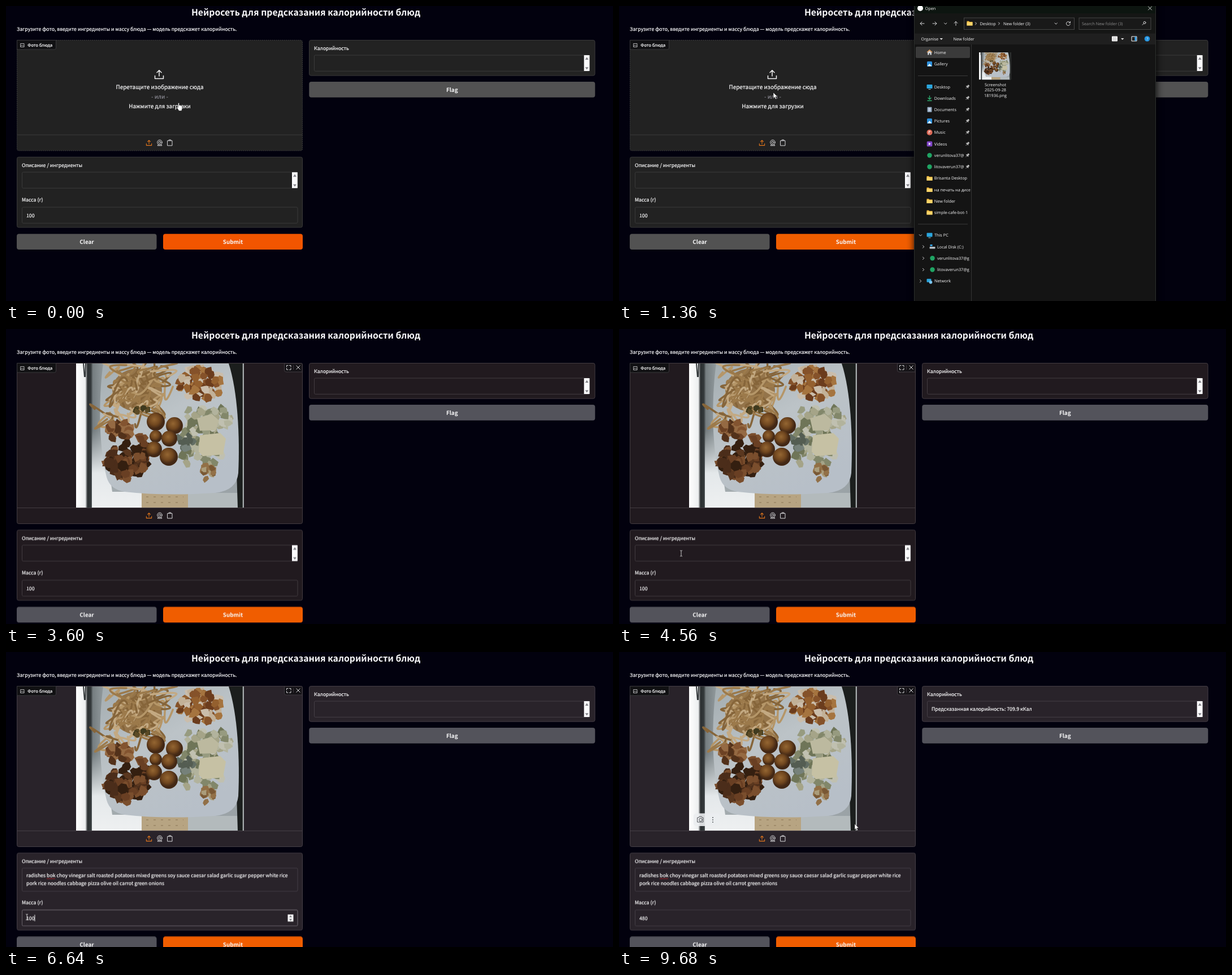
Animation, 1074 px wide and 522 px high, one loop 9760 ms. Source, as an HTML page:

```html
<!DOCTYPE html>
<html lang="ru">
<head>
<meta charset="utf-8">
<title>Калорийность блюд</title>
<style>
html, body { margin: 0; width: 100%; height: 100%; overflow: hidden; background: #02010e; }
svg { display: block; }
#stage { width: 1074px; height: 522px; }
text {
  font: 8.73px "Noto Sans CJK SC", "Noto Sans CJK JP", "Noto Sans", sans-serif;
  fill: #f8f8f9; stroke: #f8f8f9; stroke-width: .22px;
  text-rendering: geometricPrecision; white-space: pre;
}
.mid { text-anchor: middle; }
.title { font-size: 15.75px; font-weight: 600; stroke: none; }
.big { font-size: 9.95px; }
.bold { font-size: 9.87px; font-weight: 600; stroke: none; }
.tag { font-size: 7.45px; }
#dialog text { font: 7.3px "Open Sans", "Noto Sans", sans-serif; stroke: none; }
.line { fill: none; stroke: #d8d8da; stroke-width: 1; stroke-linecap: round; stroke-linejoin: round; }
#food { filter: blur(.5px); }

/* every state change shares one loop */
.s { animation: 9.76s step-end infinite; }
.panel { animation: panel 9.76s step-end infinite; }
.edge { fill: none; animation: edge 9.76s step-end infinite; }
.grey { animation: grey 9.76s step-end infinite; }
.orange { animation: orange 9.76s step-end infinite; }
@keyframes panel { 0% { fill: #222222; } 36.88% { fill: #211a1f; } 48.36%, 100% { fill: #29232a; } }
@keyframes edge { 0% { stroke: #3a3a3a; } 36.88% { stroke: #433c41; } 48.36%, 100% { stroke: #453f46; } }
@keyframes grey { 0% { fill: #525252; } 36.88%, 100% { fill: #53535b; } }
@keyframes orange { 0% { fill: #f25500; } 12.29%, 100% { fill: #f05d00; } }

@keyframes before { 0% { opacity: 1; } 36.88%, 100% { opacity: 0; } }
@keyframes after { 0% { opacity: 0; } 36.88%, 100% { opacity: 1; } }
@keyframes drop { 0% { transform: none; } 36.88%, 100% { transform: translateY(88.4px); } }
@keyframes grow { 0% { transform: none; } 50.81%, 100% { transform: translateY(12px); } }
@keyframes short { 0% { opacity: 1; } 50.81%, 100% { opacity: 0; } }
@keyframes tall { 0% { opacity: 0; } 50.81%, 100% { opacity: 1; } }
@keyframes dialog { 0% { opacity: 0; } 12.29% { opacity: 1; } 36.88%, 100% { opacity: 0; } }
@keyframes pick { 0% { opacity: 0; } 24.58%, 100% { opacity: 1; } }
@keyframes descFocus { 0% { opacity: 0; } 50.81% { opacity: 1; } 65.56%, 100% { opacity: 0; } }
@keyframes massFocus { 0% { opacity: 0; } 65.56% { opacity: 1; } 92.62%, 100% { opacity: 0; } }
@keyframes mass100 { 0% { opacity: 1; } 78.68%, 100% { opacity: 0; } }
@keyframes mass4 { 0% { opacity: 0; } 78.68% { opacity: 1; } 81.14%, 100% { opacity: 0; } }
@keyframes mass48 { 0% { opacity: 0; } 81.14% { opacity: 1; } 85.24%, 100% { opacity: 0; } }
@keyframes mass480 { 0% { opacity: 0; } 85.24%, 100% { opacity: 1; } }
@keyframes caret {
  0% { transform: translateX(14.5px); } 78.68% { transform: translateX(4.8px); }
  81.14% { transform: translateX(9.7px); } 85.24%, 100% { transform: translateX(14.5px); }
}
@keyframes result { 0% { opacity: 0; } 95.08%, 100% { opacity: 1; } }
@keyframes lens { 0% { opacity: 0; } 96.72%, 100% { opacity: 1; } }

#cursor { animation: move 9.76s ease-in-out infinite; }
@keyframes move {
  0%, 0.82% { transform: translate(307px, 178px); }
  9.2%, 14.75% { transform: translate(273px, 153px); }
  23.7%, 30.32% { transform: translate(664px, 112px); }
  37.7% { transform: translate(560px, 260px); }
  45%, 50.81% { transform: translate(110px, 397px); }
  54%, 55.8% { transform: translate(93px, 442px); }
  64%, 85.24% { transform: translate(37px, 469px); }
  92%, 94% { transform: translate(402px, 511px); }
  98.4%, 100% { transform: translate(417px, 304px); }
}
@keyframes hand {
  0% { opacity: 1; } 12.29% { opacity: 0; } 91% { opacity: 1; } 95.08%, 100% { opacity: 0; }
}
@keyframes arrow {
  0% { opacity: 0; } 12.29% { opacity: 1; } 30.32% { opacity: 0; } 37.7% { opacity: 1; }
  44% { opacity: 0; } 52.4% { opacity: 1; } 63% { opacity: 0; } 86.5% { opacity: 1; }
  91% { opacity: 0; } 95.08%, 100% { opacity: 1; }
}
@keyframes beam {
  0% { opacity: 0; } 44% { opacity: 1; } 52.4% { opacity: 0; }
  63% { opacity: 1; } 86.5%, 100% { opacity: 0; }
}
</style>
</head>
<body>
<svg id="stage" viewBox="0 0 1074 522">
<defs>
  <g id="scroll">
    <rect width="9.800" height="28" fill="#fbfbfd"/>
    <path d="M2 8h6L5 3.400zM2 21.200h6L5 25.600z" fill="#85858a"/>
  </g>
  <path id="up" d="M0 3V-7M-4-3.200 0-7.200 4-3.200M-7.500 2.500V7.500H7.500V2.500"/>
  <g id="tools">
    <use href="#up" transform="translate(253 242) scale(.62)" class="line" style="stroke:#e8791c;stroke-width:1.7"/>
    <g class="line">
      <circle cx="272" cy="241.300" r="4.300"/><circle cx="272" cy="241.300" r="2"/>
      <path d="M269.500 245 268 247h8l-1.500-2M286 238.300h8v8.700h-8zM288.300 238.300v-1.500h3.400v1.500"/>
    </g>
  </g>
  <clipPath id="photoBox"><rect x="124" y="61" width="297" height="255"/></clipPath>
  <clipPath id="sideBox"><rect x="523" y="68" width="98.500" height="454"/></clipPath>
  <linearGradient id="table">
    <stop offset="0" stop-color="#fff"/><stop offset=".055" stop-color="#eceeef"/>
    <stop offset=".068" stop-color="#2b2f31"/><stop offset=".088" stop-color="#33383a"/>
    <stop offset=".1" stop-color="#757d80"/><stop offset=".2" stop-color="#a3abae"/>
    <stop offset="1" stop-color="#9aa2a6"/>
  </linearGradient>
  <linearGradient id="plate" x2=".6" y2="1">
    <stop offset="0" stop-color="#a4adb1"/><stop offset=".5" stop-color="#bcc3c7"/>
    <stop offset="1" stop-color="#b7bfc8"/>
  </linearGradient>
  <radialGradient id="potato" cx=".42" cy=".38">
    <stop offset="0" stop-color="#946632"/><stop offset=".6" stop-color="#71471f"/>
    <stop offset="1" stop-color="#432815"/>
  </radialGradient>
  <linearGradient id="glow" x2="0" y2="1">
    <stop offset="0" stop-color="#d5dbdd" stop-opacity="0"/><stop offset=".55" stop-color="#e4e8ea"/>
    <stop offset="1" stop-color="#eef0f1"/>
  </linearGradient>
  <g id="photo" clip-path="url(#photoBox)">
    <rect x="124" y="61" width="297" height="255" fill="url(#table)"/>
    <path d="M152 180h20l16 108h54v28h-90z" fill="url(#glow)"/>
    <path d="M322 290h88v26h-88z" fill="#b3babc"/>
    <path d="M390 61h29v255h-9L404 120z" fill="#1b1e1d"/>
    <path d="M419.500 61v255" stroke="#b0b4b4" stroke-width="1.500"/>
    <path d="M137 61l2 24M141 61l-1 24" stroke="#34383a" stroke-width="2"/>
    <path d="M240 290h82v26h-82z" fill="#b7a482"/>
    <path d="M248 297h66M248 307h66" stroke="#8a7554" stroke-dasharray="4 9"/>
    <path d="M172 61C165 110 162 200 178 262Q184 284 210 288 280 296 370 290 408 286 411 255C414 190 410 110 394 61Z" fill="url(#plate)"/>
    <g id="food"></g>
  </g>
</defs>

<text class="title mid" x="530.500" y="16.700">Нейросеть для предсказания калорийности блюд</text>
<text x="19" y="44.300">Загрузите фото, введите ингредиенты и массу блюда — модель предскажет калорийность.</text>

<!-- output column -->
<rect class="panel" x="536.500" y="60.500" width="505.500" height="62.600" rx="3"/>
<rect class="edge" x="536.500" y="60.500" width="505.500" height="62.600" rx="3"/>
<text x="545" y="77.600">Калорийность</text>
<rect class="edge" x="545.500" y="87" width="487" height="28.300" rx="2"/>
<use href="#scroll" x="1022.700" y="87"/>
<text class="s" style="animation-name:result" x="553" y="104.300">Предсказанная калорийность: 709.9 кКал</text>
<rect class="grey" x="536.300" y="134" width="506" height="27.800" rx="4"/>
<text class="bold mid" x="789.300" y="151.700">Flag</text>

<!-- empty upload area -->
<g class="s" style="animation-name:before">
  <rect x="19.500" y="60.500" width="505" height="195.500" rx="3" fill="#222" stroke="#3f3f3f" stroke-dasharray="2 1.500"/>
  <path d="M19.500 228h505" stroke="#3a3a3a"/>
  <use href="#up" x="271" y="121" class="line" style="stroke:#f4f4f5;stroke-width:1.500"/>
  <text class="big mid" x="272" y="147.300">Перетащите изображение сюда</text>
  <text class="big mid" x="272" y="164.300" style="fill:#a5a4b0;stroke:none">- или -</text>
  <text class="big mid" x="272" y="180.800">Нажмите для загрузки</text>
  <use href="#tools"/>
</g>

<!-- loaded photo -->
<g class="s" style="animation-name:after">
  <rect class="panel" x="19.500" y="60.500" width="505" height="284" rx="3"/>
  <use href="#photo"/>
  <path class="edge" d="M19.500 316.500h505"/>
  <rect class="edge" x="19.500" y="60.500" width="505" height="284" rx="3"/>
  <use href="#tools" y="88"/>
  <path d="M492.500 61V73q0 3 3 3H524V61z" fill="#151317" stroke="#403a41"/>
  <path d="M508.500 64v8" stroke="#403a41"/>
  <path class="line" d="M496.500 67v-2.500h2.500M501.500 64.500h2.500V67M504 69.500V72h-2.500M499 72h-2.500v-2.500M513.800 64.800l6.400 6.400M520.200 64.800l-6.400 6.400"/>
  <g class="s" style="animation-name:lens">
    <rect x="132" y="285.500" width="46" height="22.500" rx="5" fill="#eceef0" opacity=".9"/>
    <g class="line" style="stroke:#55585c"><path d="M139 293h2l1-1.800h4l1 1.800h2v8h-10z"/><circle cx="144.500" cy="297" r="2.800"/></g>
    <g fill="#55585c"><circle cx="166" cy="293" r="1"/><circle cx="166" cy="297" r="1"/><circle cx="166" cy="301" r="1"/></g>
  </g>
</g>
<path d="M19.500 60.500H88.500V74q0 3-3 3H19.500z" fill="#111113" stroke="#39383b"/>
<path class="line" style="stroke-width:.8" d="M26 66.500h6v6h-6zM26 71l2-2 1.500 1.500 1-1 1.500 1.500"/>
<text class="tag" x="38.300" y="71.900">Фото блюда</text>

<!-- inputs -->
<g class="s" style="animation-name:drop">
  <g class="s" style="animation-name:short">
    <rect class="panel" x="19.500" y="267.300" width="505" height="124.500" rx="3"/>
    <rect class="edge" x="19.500" y="267.300" width="505" height="124.500" rx="3"/>
    <rect class="edge" x="28.500" y="294" width="487.500" height="28.300" rx="2"/>
    <use href="#scroll" x="506" y="294.200"/>
  </g>
  <g class="s" style="animation-name:tall">
    <rect class="panel" x="19.500" y="267.300" width="505" height="136.500" rx="3"/>
    <rect class="edge" x="19.500" y="267.300" width="505" height="136.500" rx="3"/>
    <rect class="edge" x="28.500" y="294" width="487.500" height="41" rx="2"/>
    <text x="36" y="310.300">radishes bok choy vinegar salt roasted potatoes mixed greens soy sauce caesar salad garlic sugar pepper white rice</text>
    <text x="36" y="323.600">pork rice noodles cabbage pizza olive oil carrot green onions</text>
    <path d="M72 313.200l1.500-1 1.500 1 1.500-1 1.500 1 1.500-1 1.500 1 1.500-1 1.500 1 1.500-1 1.500 1" fill="none" stroke="#c8262c" stroke-width=".9"/>
  </g>
  <g class="s" style="animation-name:descFocus">
    <rect x="28.500" y="294" width="487.500" height="41" rx="2" fill="none" stroke="#666068"/>
    <path d="M279.500 314.200v11.500" stroke="#fff"/>
  </g>
  <text x="28" y="285.100">Описание / ингредиенты</text>
  <g class="s" style="animation-name:grow">
    <text x="28" y="346.300">Масса (г)</text>
    <rect class="edge" x="28.500" y="356" width="487.500" height="28.300" rx="2"/>
    <text class="s" style="animation-name:mass100" x="36" y="373.600">100</text>
    <text class="s" style="animation-name:mass4" x="36" y="373.600">4</text>
    <text class="s" style="animation-name:mass48" x="36" y="373.600">48</text>
    <text class="s" style="animation-name:mass480" x="36" y="373.600">480</text>
    <g class="s" style="animation-name:massFocus">
      <rect x="28.500" y="356" width="487.500" height="28.300" rx="2" fill="none" stroke="#666068"/>
      <path class="s" style="animation-name:caret" d="M36.300 364.500v11.500" stroke="#fff"/>
      <rect x="498.500" y="364" width="10" height="12.500" fill="#f4f4f6"/>
      <path d="M501 368.700h5l-2.500-3zM501 372h5l-2.500 3z" fill="#6d6d72"/>
    </g>
    <rect class="grey" x="19" y="403.200" width="247.500" height="27.900" rx="4"/>
    <rect class="orange" x="278" y="403.200" width="247" height="27.900" rx="4"/>
    <text class="bold mid" x="143" y="420.900">Clear</text>
    <text class="bold mid" x="401.500" y="420.900">Submit</text>
  </g>
</g>

<!-- file chooser -->
<g id="dialog" class="s" style="animation-name:dialog">
  <rect x="523" y="-10" width="427" height="542" style="filter:drop-shadow(0 0 7px #000)" fill="#141414"/>
  <rect x="523" width="427" height="13" fill="#0d1510"/>
  <rect x="523" y="13" width="427" height="35.500" fill="#151615"/>
  <rect x="523" y="48.500" width="427" height="19.500" fill="#1f1f1f"/>
  <path d="M522.500 0v522M949.500 0v522" stroke="#2c2f2d"/>
  <circle cx="533" cy="4" r="5" fill="#fff"/>
  <text x="541.500" y="7.200">Open</text>
  <rect x="610.500" y="21" width="195" height="20.500" fill="#191919" stroke="#464646"/>
  <rect x="814" y="21" width="127" height="20.500" fill="#191919" stroke="#464646"/>
  <g class="line">
    <path d="M936.500 1l6 6M942.500 1l-6 6M540 31h-7M536 28l-3 3 3 3M555 31h7M559 28l3 3-3 3M596 34.500v-7M593 30.500l3-3 3 3"/>
    <path d="M575.500 30l2.200 2.200 2.200-2.200M771 30l2.200 2.200 2.200-2.200M630.500 29l2 2-2 2M671.500 29l2 2-2 2"/>
    <path d="M798 29.500a3.500 3.500 0 1 0 .3 2.500M798.500 27.500v2.300h-2.300M926 33.500l2.700-2.700"/>
    <circle cx="930" cy="29.500" r="2"/>
  </g>
  <text x="638.500" y="33.700">Desktop</text>
  <text x="680" y="33.700">New folder (3)</text>
  <text x="819" y="33.700" style="fill:#8c8c8c">Search New folder (3)</text>
  <text x="534.500" y="60.700">Organise</text>
  <text x="591.500" y="60.700">New folder</text>
  <path d="M567.500 57h5.500l-2.700 3zM888 57h5.500l-2.700 3z" fill="#ddd"/>
  <path d="M872.500 54h9v8h-9z" fill="#ddd" stroke="#fff"/>
  <path d="M907 54h9v8h-9z" fill="none" stroke="#fff"/><path d="M912.500 54.500h3v7h-3z" fill="#39a5ef"/>
  <circle cx="934.500" cy="58" r="4.800" fill="#2394e0"/>
  <text class="mid" x="934.500" y="60.700">?</text>
  <path d="M623.500 68v454" stroke="#343434"/>
  <path d="M529 123.500h88M529 386h88" stroke="#3a3a3a"/>
  <rect x="525" y="72" width="96" height="20" rx="2" fill="#3a3a3a"/>
  <g id="side" clip-path="url(#sideBox)"></g>
  <rect class="s" style="animation-name:pick" x="633.500" y="72.500" width="65.500" height="91.500" fill="#5c5c5c" stroke="#b9b9b9"/>
  <use href="#photo" transform="translate(613.400 70.400) scale(.19)"/>
  <text class="mid" x="666" y="141.700">Screenshot</text>
  <text class="mid" x="666" y="151.200">2025-09-28</text>
  <text class="mid" x="666" y="160.500">181936.png</text>
</g>

<g id="cursor">
  <path class="s" style="animation-name:arrow" d="M0 0V10.500L2.400 8.300 4.100 12 5.800 11.200 4.100 7.600H7.400Z" fill="#fff" stroke="#111" stroke-width=".6"/>
  <path class="s" style="animation-name:hand" d="M-2.500-6q1.200-1 2 0V-2.500l3.800.8q1.500.5 1.500 2V3.500L3.600 7.500H-1L-4.500 2q-.3-1.500 1-1.300L-2.500 1.500Z" fill="#fff" stroke="#222" stroke-width=".6"/>
  <path class="s" style="animation-name:beam" d="M-2-5H-.500L0-4.500.500-5H2M0-4.500V4.500M-2 5H-.500L0 4.500.500 5H2" fill="none" stroke="#dcdcdc" stroke-width=".9"/>
</g>
</svg>

<script>
const byId = id => document.getElementById(id);

// sidebar
const icons = {
  home: '<path d="M-4.500 0 0-4 4.500 0" fill="none" stroke="#e8a35e" stroke-width="1.500"/><path d="M-3.300 0 0-2.800 3.300 0V4.500H1V1.500H-1V4.500H-3.300z" fill="#d9dce0"/>',
  pics: '<rect x="-4.500" y="-4.500" width="9" height="9" rx="1.500" fill="#2b8fdc"/><path d="M-4 4 0-.5 4 4z" fill="#e4f2fd"/>',
  screen: '<rect x="-5" y="-4" width="10" height="7" rx="1" fill="#2ba6de"/><path d="M-2 4.500H2" stroke="#9cc"/>',
  down: '<path d="M0-4.500V2M-3-.8 0 2.200 3-.8M-4 4.500H4" fill="none" stroke="#2fb574" stroke-width="1.300"/>',
  doc: '<rect x="-4" y="-4.500" width="8" height="9" rx="1" fill="#8ea6bd"/><path d="M-2-2H2M-2 0H2M-2 2H2" stroke="#eef"/>',
  music: '<circle r="5" fill="#dc6a58"/><path d="M-1 2V-2.500L2-1.500" fill="none" stroke="#fff"/>',
  video: '<rect x="-4.800" y="-4.500" width="9.600" height="9" rx="1.500" fill="#8146c8"/><path d="M-1.500-2.200V2.200L2.300 0z" fill="#fff"/>',
  cloud: '<circle r="4.200" fill="#1fa463"/>',
  folder: '<path d="M-5-3.800h3.500l1.200 1.300H5v6.500H-5z" fill="#eeb83e"/><path d="M-5-1.500H5v5.500H-5z" fill="#fbd56a"/>',
  disk: '<rect x="-5" y="0" width="10" height="3.500" rx="1" fill="#b8c0c6"/><rect x="-4" y="-4" width="4" height="3" fill="#37a3e4"/>',
  net: '<rect x="-5" y="-4" width="8" height="6" rx="1" fill="#2ba6de"/><circle cx="2" cy="2" r="2.800" fill="#7cc4ee"/>'
};
const put = (name, x, y) => `<g transform="translate(${x} ${y})">${icons[name]}</g>`;
const pin = y => `<path transform="translate(616.500 ${y})" d="M-3 3-.500.500M-2.300-1.200 1.200 2.300 1.400.200 3.400-1.600 1.600-3.400-.200-1.400z" fill="#bbb" stroke="#bbb" stroke-width=".8"/>`;
const row = ([icon, label, y, pinned]) => put(icon, 549.5, y) +
  `<text x="557.800" y="${y + 2.6}">${label}</text>` + (pinned ? pin(y) : '');
const branch = ([icon, label, y, x, open]) => put(icon, x - 8.5, y) +
  `<text x="${x}" y="${y + 2.6}">${label}</text><path class="line" transform="translate(${x - 24.5} ${y})" d="${open ? 'M-2.200-1 0 1.200 2.200-1' : 'M-1-2.200 1.200 0-1 2.200'}"/>`;

byId('side').innerHTML = [
  ['home', 'Home', 82], ['pics', 'Gallery', 102.5],
  ['screen', 'Desktop', 143, 1], ['down', 'Downloads', 163, 1],
  ['doc', 'Documents', 183.3, 1], ['pics', 'Pictures', 203.5, 1],
  ['music', 'Music', 223.8, 1], ['video', 'Videos', 244, 1],
  ['cloud', 'verunlitova37@', 264.3, 1], ['cloud', 'litovaverun37@', 284.5, 1],
  ['folder', 'Brisanta Desktop', 304.7], ['folder', 'на печать на дисер', 325],
  ['folder', 'New folder', 345], ['folder', 'simple-cafe-bot-1', 365.2]
].map(row).join('') + [
  ['screen', 'This PC', 405.6, 558, 1], ['disk', 'Local Disk (C:)', 426, 563],
  ['cloud', 'verunlitova37@g', 446.3, 563], ['cloud', 'litovaverun37@g', 466.5, 563],
  ['net', 'Network', 486.7, 558]
].map(branch).join('');
byId('dialog').insertAdjacentHTML('beforeend', put('folder', 620.5, 30.5));

// plate of food from seeded shapes
let seed = 11;
const rnd = () => (seed = seed * 16807 % 2147483647) / 2147483647;
const span = r => (rnd() * 2 - 1) * r;
const pickOne = list => list[Math.floor(rnd() * list.length)];

function chunks(cx, cy, rx, ry, count, size, colors) {
  let out = '';
  for (let i = 0; i < count; i++) {
    const a = rnd() * 6.283, d = Math.sqrt(rnd());
    const x = cx + Math.cos(a) * d * rx, y = cy + Math.sin(a) * d * ry;
    let pts = '';
    for (let k = 0; k < 7; k++) {
      const r = size * (0.5 + rnd() * 0.6), b = k * 0.898;
      pts += `${(x + Math.cos(b) * r).toFixed(1)},${(y + Math.sin(b) * r).toFixed(1)} `;
    }
    out += `<polygon points="${pts}" fill="${pickOne(colors)}"/>`;
  }
  return out;
}

function noodles(cx, cy, rx, ry, count) {
  let out = '';
  for (let i = 0; i < count; i++) {
    const x = cx + span(rx), y = cy + span(ry);
    out += `<path d="M${x} ${y}q${span(18)} ${span(20)} ${span(28)} ${span(26)}t${span(16)} ${span(16)}" ` +
      `fill="none" stroke="${pickOne(['#b59668', '#9c7a4b', '#c3a982', '#86653a'])}" stroke-width="3.500" stroke-linecap="round"/>`;
  }
  return out;
}

const potatoes = [[265, 164, 16], [298, 171, 15], [265, 190, 11], [289, 194, 14], [262, 213, 14], [288, 226, 16]];
const greens = ['#979b80', '#b2b39d', '#82876a', '#a5a488', '#6f7558', '#c0c0b0'];
const meat = ['#4b2d1a', '#693f23', '#341f10', '#7a4e2d', '#5a371f'];
byId('food').innerHTML =
  '<ellipse cx="232" cy="108" rx="44" ry="38" fill="#94744a"/>' +
  noodles(232, 105, 40, 34, 60) + noodles(188, 158, 18, 12, 9) +
  chunks(345, 97, 40, 30, 75, 9, ['#85522a', '#6b3c1d', '#a5743f', '#c2b198', '#94602f', '#cabdab']) +
  chunks(355, 158, 42, 24, 45, 9, greens) +
  chunks(345, 208, 38, 40, 60, 9, greens) +
  chunks(318, 196, 13, 17, 16, 7, ['#636e64', '#76817a', '#545d52']) +
  '<path d="M343 188l36-4 10 10-5 28-36 3-7-8z" fill="#c6c1a4"/>' +
  '<path d="M338 158l26-8 13 12-6 17-28 1z" fill="#bcb99f"/>' +
  chunks(356, 252, 14, 14, 16, 7, ['#795835', '#927047', '#aa9c7a']) +
  chunks(200, 180, 20, 18, 24, 10, ['#6d4224', '#835430', '#52311a', '#956a43']) +
  chunks(213, 234, 36, 32, 75, 10, meat) +
  chunks(240, 212, 14, 22, 18, 9, meat) +
  potatoes.map(([x, y, r]) => `<circle cx="${x}" cy="${y}" r="${r}" fill="url(#potato)"/>`).join('') +
  chunks(240, 145, 14, 6, 7, 6, ['#3f3a1e', '#5b4a25']);
</script>
</body>
</html>
```
